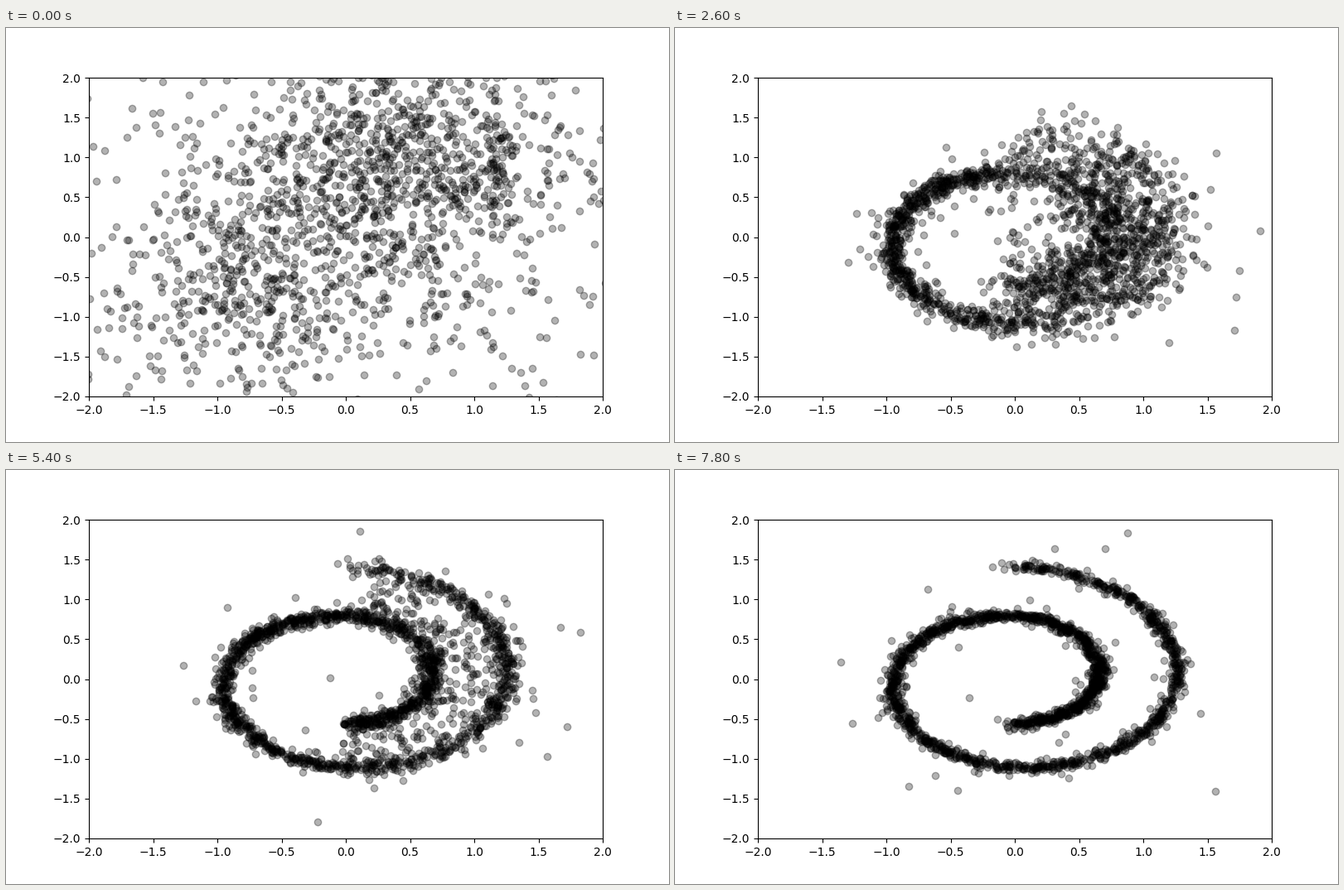
A matplotlib script for the animation above (8 s loop, 800 by 500 pixels).

```python
import numpy as np
import matplotlib.pyplot as plt
from matplotlib.animation import FuncAnimation

POINTS = 2000
FRAMES = 40
INTERVAL = 200
TURN = 2 * np.pi

# Shape of the cloud at a few frames of the training run
KEYS = [5, 13, 19, 23, 31, 39]
SHAPE = {
    "left": [0.092, 0.062, 0.052, 0.048, 0.037, 0.033],
    "right": [0.18, 0.135, 0.085, 0.065, 0.037, 0.033],
    "bridge": [1.0, 0.80, 0.60, 0.42, 0.04, 0.0],
    "inside": [0.008, 0.030, 0.018, 0.005, 0.001, 0.001],
    "stray": [0.008, 0.025, 0.022, 0.035, 0.030, 0.022],
    "swell": [0.00, 0.00, 0.00, -0.02, 0.07, 0.02],
    "trim": [0.40, 0.28, 0.20, 0.05, 0.08, 0.0],
}

# Early cloud: weight, centre x, centre y, spread x, spread y
BLOBS = np.array([
    [0.34, 0.42, 0.95, 0.62, 0.72],
    [0.15, -0.80, -0.70, 0.45, 0.65],
    [0.15, 0.00, 0.00, 0.75, 0.85],
    [0.24, -0.20, 0.20, 1.50, 1.50],
    [0.02, 1.17, 1.05, 0.05, 0.45],
    [0.10, 0.00, 0.00, 4.00, 4.00],
])


def cloud(rng):
    b = BLOBS[rng.choice(len(BLOBS), POINTS, p=BLOBS[:, 0])]
    return b[:, 1:3] + b[:, 3:5] * rng.normal(size=(POINTS, 2))


def roll(rng, frame):
    p = {name: np.interp(frame, KEYS, vals) for name, vals in SHAPE.items()}
    t = 1.5 * np.pi + (3 * np.pi - p["trim"]) * rng.random(POINTS)
    t += 0.08 * rng.normal(size=POINTS)
    inner = t < 2.5 * np.pi
    outer = t > 3.5 * np.pi

    # Right half: points not yet settled lie between the two turns
    gap = rng.random(POINTS) * (rng.random(POINTS) < p["bridge"])
    r = (t + TURN * gap * (inner * 1.0 - outer)) / 10
    r += inner * p["swell"] + 0.07 * np.exp(-(t - 1.5 * np.pi) / 0.4)

    stray = rng.random(POINTS) < p["stray"]
    r *= 1 + stray * rng.exponential(0.25, POINTS)
    inside = rng.random(POINTS) < p["inside"]
    r = np.where(inside, r * rng.random(POINTS), r)

    side = np.clip(2 * np.cos(t) + 0.5, 0, 1)
    sd = p["left"] + (p["right"] - p["left"]) * side
    sd = np.where(stray, 2 * sd, sd)
    xy = np.column_stack([r * np.cos(t), r * np.sin(t)])
    return xy + 0.85 * sd[:, None] * rng.standard_t(5, size=(POINTS, 2))


def sample(frame):
    rng = np.random.default_rng(100 + frame)
    wild = max(0.0, 0.55 ** frame - 0.01 * frame)
    base = roll(rng, frame)
    return base + wild * (cloud(rng) - base)


fig, ax = plt.subplots(figsize=(8, 5), dpi=100)
ax.set_xlim(-2, 2)
ax.set_ylim(-2, 2)
dots = ax.scatter(*sample(0).T, color="black", alpha=0.3)


def update(frame):
    dots.set_offsets(sample(frame))
    return dots,


anim = FuncAnimation(fig, update, frames=FRAMES, interval=INTERVAL,
                     repeat=True, repeat_delay=0)
plt.show()
```
